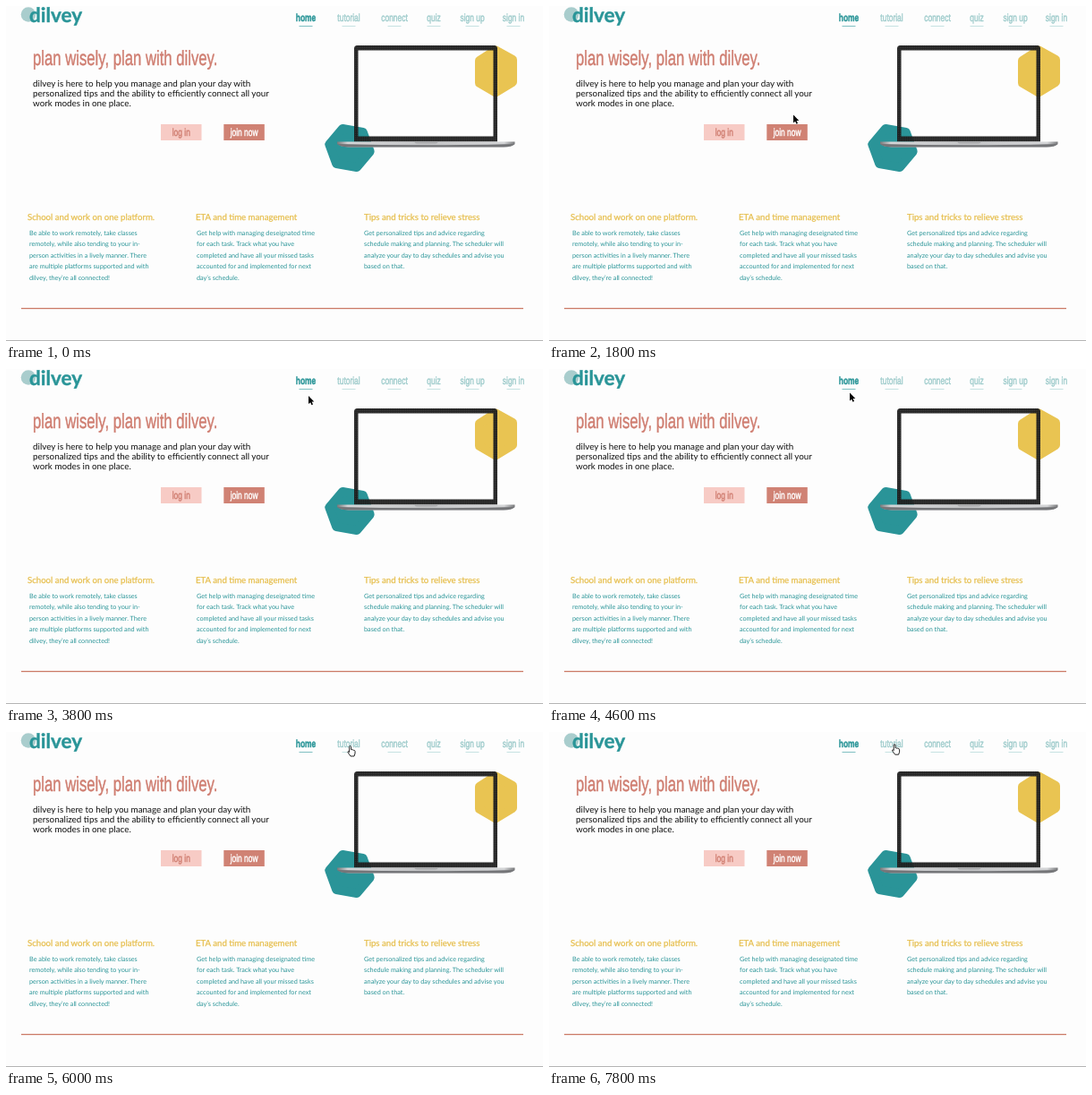
Animation, 600 px wide and 374 px high, one loop 8000 ms. Source, as an HTML page:

```html
<!DOCTYPE html>
<html lang="en">
<head>
<meta charset="utf-8">
<title>Planner landing page</title>
<style>
  html, body { margin: 0; width: 100%; height: 100%; overflow: hidden; background: #fdfdfd; }
  svg { display: block; width: 100%; height: 100%; text-rendering: geometricPrecision; }
  text { font-family: Lato, "Open Sans", sans-serif; }
  .narrow { font-family: "Liberation Sans", Arial, sans-serif; stroke-width: .45; }
  .logo { font-size: 22.5px; font-weight: 700; fill: #2a9598; stroke: #2a9598; stroke-width: .4; stroke-linejoin: round; }
  .intro { font-size: 9.87px; fill: #111; }
  .title { font-size: 9.65px; fill: #e6be4c; stroke: #e6be4c; stroke-width: .25; }
  .copy { font-size: 7.28px; fill: #2a9598; }
</style>
</head>
<body>
<svg id="stage" viewBox="0 0 600 374" preserveAspectRatio="none">
  <defs>
    <pattern id="mesh" width="2" height="2" patternUnits="userSpaceOnUse">
      <rect width="2" height="2" fill="#1a1a1a" fill-opacity=".94"/>
      <rect width="1" height="1" fill="#4a4a4a" fill-opacity=".5"/>
    </pattern>
    <linearGradient id="metal">
      <stop offset="0" stop-color="#77787a"/>
      <stop offset=".06" stop-color="#d4d5d7"/>
      <stop offset=".5" stop-color="#c3c4c6"/>
      <stop offset=".94" stop-color="#d4d5d7"/>
      <stop offset="1" stop-color="#77787a"/>
    </linearGradient>
  </defs>
  <rect width="600" height="374" fill="#fdfdfd"/>
  <g id="page"></g>

  <g stroke-linejoin="round" stroke-width="10">
    <path d="M547 49.5 566 60V85L547 96.5 529 86V61Z" fill="#e9c452" stroke="#e9c452"/>
    <path d="M406.7 162.5 391.9 180.1 369.2 176.1 361.3 154.5 376.1 136.9 398.8 140.9Z" fill="#2a9498" stroke="#2a9498"/>
  </g>

  <path fill="url(#mesh)" fill-rule="evenodd"
    d="M389 151.5V47.5Q389 44 392.5 44H545.5Q549 44 549 47.5V151.5ZM393.5 49.5V145.5H544.5V49.5Z"/>
  <path d="M370 151.5H568.5V154Q566 157 556 157.5H383Q373 157 370 154Z" fill="url(#metal)"/>
  <path d="M370 154Q470 156.5 568.5 154 566 157 556 157.6H383Q373 157 370 154Z" fill="#747578"/>
  <path d="M456 151.5H483Q482 153.5 480 153.5H459Q457 153.5 456 151.5Z" fill="#a7a8aa"/>

  <path d="M17 337.6H578" stroke="#cb7965" stroke-width="1.2"/>
  <path d="M0 373.5H600" stroke="#b4b4b4"/>

  <path id="arrow" d="M0 0V9L2.1 7.2 3.5 10.3 5 9.6 3.6 6.6H6.3Z"
    fill="#000" stroke="#fff" stroke-width=".7" paint-order="stroke"/>
  <path id="hand" d="M1.6 7V1.2Q1.6 0 2.5 0T3.5 1.2V4.2Q4.3 3.6 5 4.5 5.9 4 6.5 4.9 7.8 4.6 8 6V8.5L7 11.5H3L.2 7.6Q-.6 6.3.5 6Z"
    fill="#fff" stroke="#111" stroke-width=".9" stroke-linejoin="round"/>
</svg>
<script>
const NS = "http://www.w3.org/2000/svg";
const page = document.getElementById("page");
const arrow = document.getElementById("arrow");
const hand = document.getElementById("hand");

function add(tag, attrs, text) {
  const el = document.createElementNS(NS, tag);
  for (const key in attrs) el.setAttribute(key, attrs[key]);
  if (text) el.textContent = text;
  page.appendChild(el);
}

function lines(cls, x, y, step, rows) {
  rows.forEach((row, i) => add("text", { class: cls, x, y: y + i * step }, row));
}

// One shared condensed face for headings, links and buttons.
function narrow(text, x, y, size, color, anchor = "middle", weight = 400) {
  add("text", {
    class: "narrow", transform: `translate(${x} ${y}) scale(.72 1)`,
    "font-size": size, "font-weight": weight, "text-anchor": anchor, fill: color, stroke: color
  }, text);
}

function button(label, x, fill, color) {
  add("rect", { x, y: 132, width: 45.5, height: 18, fill });
  narrow(label, x + 22.8, 145.4, 11.7, color);
}

add("circle", { cx: 25, cy: 9.5, r: 8.3, fill: "#a9cdcd" });
add("text", { class: "logo", x: 26, y: 18 }, "dilvey");

const links = [["home", 335], ["tutorial", 383], ["connect", 434], ["quiz", 478], ["sign up", 521], ["sign in", 567]];
links.forEach(([label, x], i) => {
  const color = i ? "#9ccaca" : "#2a9598";
  narrow(label, x, 17.3, 11.7, color, "middle", i ? 400 : 700);
  add("rect", { x: x - 7.5, y: 22, width: 15, height: .8, fill: i ? "#b9dcdd" : "#62b2b5" });
});

narrow("plan wisely, plan with dilvey.", 30, 66.3, 23.2, "#cf7d70", "start");
lines("intro", 30, 89.5, 11.4, [
  "dilvey is here to help you manage and plan your day with",
  "personalized tips and the ability to efficiently connect all your",
  "work modes in one place."
]);
button("log in", 173, "#f7cbc5", "#cf7d70");
button("join now", 243.3, "#d08274", "#fff");

lines("title", 24, 238.5, 0, ["School and work on one platform."]);
lines("copy", 26, 255.5, 12.55, [
  "Be able to work remotely, take classes",
  "remotely, while also tending to your in-",
  "person activities in a lively manner. There",
  "are multiple platforms supported and with",
  "dilvey, they’re all connected!"
]);
lines("title", 212, 239, 0, ["ETA and time management"]);
lines("copy", 213, 255.5, 12.55, [
  "Get help with managing deseignated time",
  "for each task. Track what you have",
  "completed and have all your missed tasks",
  "accounted for and implemented for next",
  "day’s schedule."
]);
lines("title", 400, 238.5, 0, ["Tips and tricks to relieve stress"]);
lines("copy", 400, 255.5, 12.55, [
  "Get personalized tips and advice regarding",
  "schedule making and planning. The scheduler will",
  "analyze your day to day schedules and advise you",
  "based on that."
]);

// Pointer stops: time, x, y.
const LOOP = 8000, TICK = 200, APPEAR = 1400;
const stops = [
  [1400, 266, 165], [1800, 273, 121.5], [2200, 273, 121.5], [3000, 355, 102.5],
  [3800, 338, 30], [4600, 336, 26.5], [5000, 338, 25], [5400, 371.5, 18],
  [5800, 382, 15.5], [6800, 382, 15.5], [7200, 383.6, 13.7], [8000, 383.6, 13.7]
];

function pointer(t) {
  const i = Math.max(1, stops.findIndex(s => s[0] > t));
  const [t0, x0, y0] = stops[i - 1], [t1, x1, y1] = stops[i];
  const p = (t - t0) / (t1 - t0), k = p * p * (3 - 2 * p);
  return [x0 + (x1 - x0) * k, y0 + (y1 - y0) * k];
}

function draw(time) {
  const t = Math.floor(time % LOOP / TICK) * TICK;
  const [x, y] = pointer(Math.max(t, APPEAR));
  const overLink = x > 374 && y < 20;
  const place = `translate(${x} ${y})`;
  arrow.setAttribute("transform", place);
  hand.setAttribute("transform", place);
  arrow.setAttribute("visibility", t >= APPEAR && !overLink ? "visible" : "hidden");
  hand.setAttribute("visibility", t >= APPEAR && overLink ? "visible" : "hidden");
}

const start = performance.now();
function loop() {
  draw(performance.now() - start);
  requestAnimationFrame(loop);
}
loop();
</script>
</body>
</html>
```
